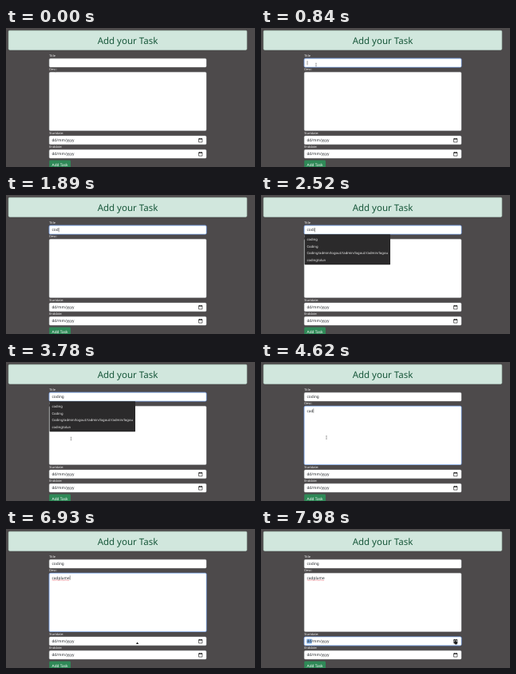
An HTML page that plays this animation: 312 px wide and 174 px high, repeating every 8 s.

```html
<!DOCTYPE html>
<html lang="en">
<head>
<meta charset="utf-8">
<title>Add your Task</title>
<style>
  html, body { margin: 0; width: 100%; height: 100%; overflow: hidden; background: #4d4a4b; }
  svg { display: block; width: 100%; height: 100%; }
  text { font-family: "Noto Sans", "Open Sans", sans-serif; text-rendering: geometricPrecision; white-space: pre; }
  .label { font-size: 3.9px; fill: #f4f4f4; }
  .value { font-size: 4.75px; fill: #212529; }
  .item { font-size: 4.23px; fill: #f0f0f0; }
  .field { fill: #fff; stroke: #ced4da; stroke-width: .4; }
  .field.on { stroke: #86b7fe; stroke-width: .6; }
  .ring { fill: none; stroke: #6f8fe0; stroke-opacity: .45; stroke-width: 1.2; }
</style>
</head>
<body>
<svg id="stage" viewBox="0 0 312 174" preserveAspectRatio="none"></svg>
<script>
const LOOP = 8000, STEP = 210;
const stage = document.getElementById("stage");

function add(tag, attrs, parent = stage) {
  const el = document.createElementNS("http://www.w3.org/2000/svg", tag);
  for (const key in attrs) el.setAttribute(key, attrs[key]);
  parent.appendChild(el);
  return el;
}
function label(x, y, cls, str, parent) {
  const el = add("text", { x, y, class: cls }, parent);
  el.textContent = str;
  return el;
}
function field(y, h) {
  const box = { x: 54.2, y, width: 196.8, height: h, rx: 1.5 };
  const ring = add("rect", { ...box, class: "ring" });
  const rect = add("rect", { ...box, class: "field" });
  return on => {
    ring.style.display = on ? "" : "none";
    rect.classList.toggle("on", on);
  };
}
function calendar(y) {
  add("path", { d: `M241.5 ${y}h4.4v4.3h-4.4z`, fill: "none", stroke: "#111", "stroke-width": .6 });
  add("path", { d: `M241.5 ${y + .5}h4.4M242.6 ${y - .8}v1M244.8 ${y - .8}v1`, stroke: "#111", "stroke-width": .8 });
}
const show = (el, on) => { el.style.display = on ? "" : "none"; };

// Page
add("rect", { width: 312, height: 174, fill: "#4d4a4b" });
add("rect", { x: 3.2, y: 3.2, width: 298.6, height: 24.2, rx: 1.4, fill: "#d1e7dd", stroke: "#badbcc", "stroke-width": .5 });
const heading = label(152.5, 19.9, "", "Add your Task");
heading.setAttribute("style", "font-size:11.5px;font-weight:500;fill:#17573a;text-anchor:middle");

label(54.2, 36.3, "label", "Title");
label(54.2, 53.4, "label", "Desc:");
label(54.2, 133, "label", "Startdate:");
label(54.2, 150.3, "label", "Enddate:");

const focusTitle = field(38.2, 10.8);
const focusDesc = field(55.3, 73.2);
const focusStart = field(135, 10.8);
field(152.2, 10.8)(false);

const picked = add("rect", { x: 57.2, y: 137.6, width: 6.5, height: 5.9, fill: "#7fb0e8" });
label(57.4, 142.2, "value", "dd/mm/yyyy");
label(57.4, 159.4, "value", "dd/mm/yyyy");
calendar(138.6);
calendar(155.8);

add("rect", { x: 54.2, y: 165.5, width: 26.8, height: 11, rx: 1.4, fill: "#2f8957" });
label(57.6, 172.9, "value", "Add Task").style.fill = "#fff";

const title = label(57.6, 45.4, "value", "");
const desc = label(57.6, 62.8, "value", "");
const squiggle = add("path", { fill: "none", stroke: "#d8505a", "stroke-width": .5 });
const caret = add("rect", { width: .45, height: 5.4, fill: "#222" });

// Suggestions
const menu = add("g", {});
const panel = add("rect", { x: 54.6, y: 49.2, width: 107.4, fill: "#2b2a2b", rx: .6 }, menu);
const clip = add("clipPath", { id: "cut" });
add("rect", { x: 55, y: 49, width: 104.8, height: 60 }, clip);
const list = add("g", { "clip-path": "url(#cut)" }, menu);
const rows = ["coding", "codplume competition", "Coding",
  "Coding/admin/logout//admin/logout//admin/logou", "codingtolun"]
  .map(str => label(57.4, 0, "item", str, list));

// Pointer shapes
const pointer = add("g", {});
const beam = add("path", { d: "M-.8 -1.8h1.6M0 -1.8v3.6M-.8 1.8h1.6", stroke: "#555", "stroke-width": .45 }, pointer);
const arrow = add("path", { d: "M0 -1.4l1.8 2.4h-3.4z", fill: "#222" }, pointer);
const hand = add("path", { d: "M-.6 -2.2h1v1.8l1.8 .4v2l-.7 1.4h-2.4l-1.5 -2.2z", fill: "#1c1c1c", stroke: "#eee", "stroke-width": .25 }, pointer);

// [step, value] lists hold their value until the next entry
const titleKeys = [[0, ""], [5, "cod"], [6, "codin:"], [8, "codin"], [9, "cod"], [11, "codi"], [15, "codin"], [16, "coding"]];
const menuKeys = [[0, 0], [5, 1], [6, .72], [7, 0], [11, 1], [19, .4], [20, 0]];
const pointerKeys = [[0, 62, 53], [2, 69, 46], [17, 69, 46], [18, 81.5, 96], [19, 82, 94.5],
  [30, 82, 94.5], [33, 164.5, 143], [36, 244, 141], [39, 244, 141]];

const hold = (keys, k) => keys.filter(key => key[0] <= k).pop()[1];

function glide(keys, k) {
  const i = Math.max(1, keys.findIndex(key => key[0] >= k));
  const [k0, x0, y0] = keys[i - 1], [k1, x1, y1] = keys[i];
  const p = (k - k0) / (k1 - k0);
  return [x0 + (x1 - x0) * p, y0 + (y1 - y0) * p];
}

function drawMenu(k) {
  const alpha = hold(menuKeys, k), full = k < 10;
  show(menu, alpha > 0);
  menu.setAttribute("opacity", alpha);
  let y = full ? 57.5 : 57;
  rows.forEach((row, i) => {
    const on = full || i !== 1;
    show(row, on);
    row.setAttribute("y", y);
    if (on) y += 8.5;
  });
  panel.setAttribute("height", full ? 47.2 : 38);
}

function draw(ms) {
  const k = Math.floor(ms / STEP);
  const inTitle = k >= 4 && k < 19, inDesc = k >= 19 && k < 37;
  focusTitle(inTitle);
  focusDesc(inDesc);
  focusStart(k >= 37);
  show(picked, k >= 37);

  title.textContent = hold(titleKeys, k);
  desc.textContent = "cadplume".slice(0, Math.max(0, k - 19));
  const active = inTitle ? title : desc;
  const blink = inTitle ? k !== 6 && k < 16 : inDesc && (k < 29 || k % 5 > 1);
  show(caret, blink);
  caret.setAttribute("x", 57.8 + active.getComputedTextLength());
  caret.setAttribute("y", inTitle ? 41 : 58.3);

  show(squiggle, k >= 29);
  squiggle.setAttribute("d", "M57.6 63.9" + "l.6 .4l.6 -.4".repeat(Math.floor(desc.getComputedTextLength() / 1.2)));

  drawMenu(k);

  const [x, y] = glide(pointerKeys, k);
  show(pointer, k < 5 || k >= 18);
  pointer.setAttribute("transform", `translate(${x} ${y})`);
  show(beam, k < 31);
  show(arrow, k >= 31 && k < 36);
  show(hand, k >= 36);
}

const start = performance.now();
function tick() {
  draw((performance.now() - start) % LOOP);
  requestAnimationFrame(tick);
}
tick();
</script>
</body>
</html>
```
